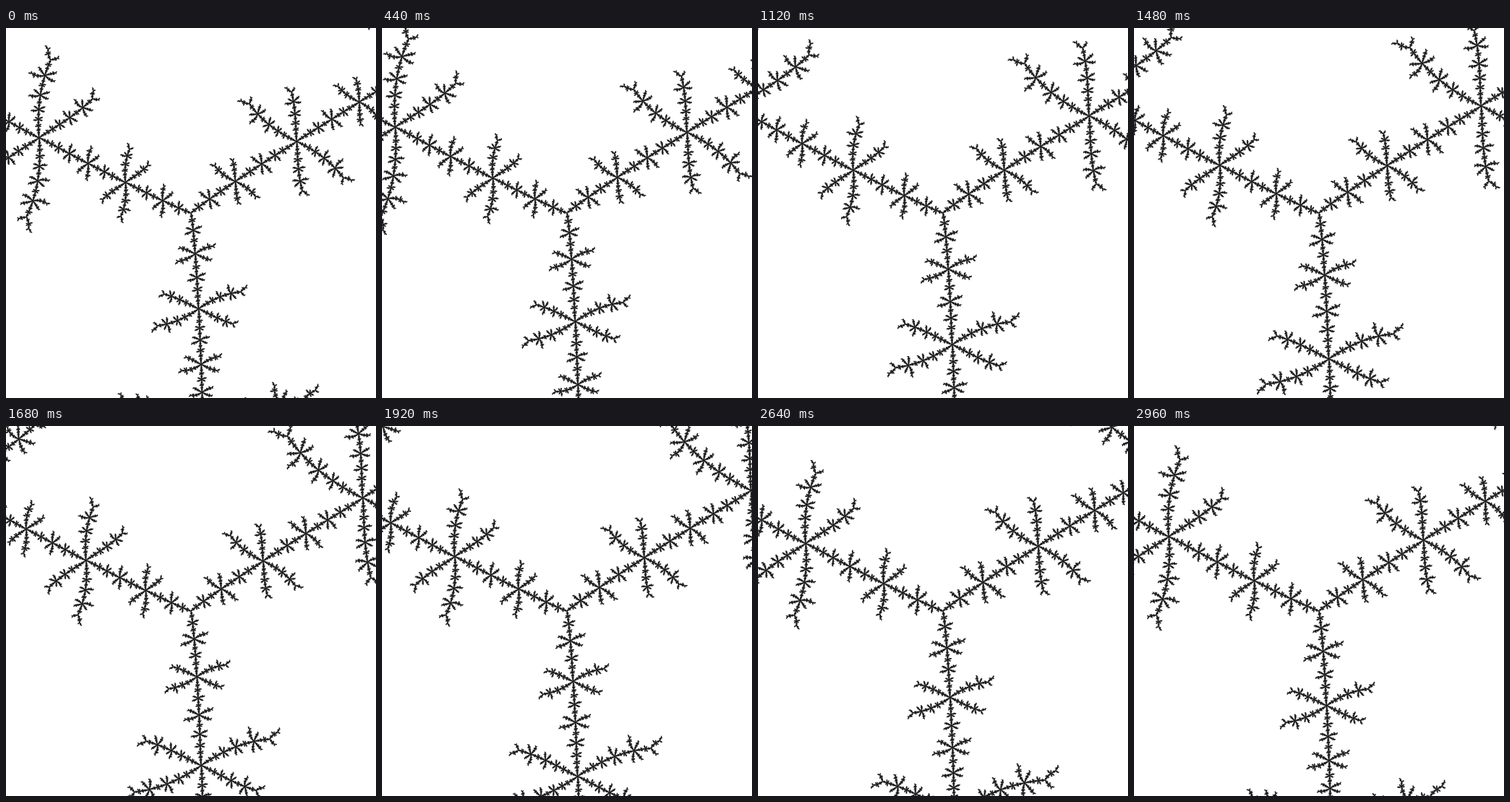
Recreate the animation shown at these times as an HTML page with a canvas. Size 512x512 px, loop 3 s.

```html
<!DOCTYPE html>
<html lang="en">
<head>
<meta charset="utf-8">
<title>Dendrite zoom</title>
<style>
  html, body { margin: 0; width: 100%; height: 100%; overflow: hidden; background: #fff; }
  canvas { display: block; width: 100vmin; height: 100vmin; }
</style>
</head>
<body>
<canvas id="stage" width="512" height="512"></canvas>
<script>
const SIZE = 512, LOOP = 3000, STEP = 40;
const MAX_ITER = 110, BAILOUT = 1e6, LINE = 0.7;
const DEPTH = 30;

const ctx = document.getElementById('stage').getContext('2d');
const image = ctx.createImageData(SIZE, SIZE);
const pixels = new Uint32Array(image.data.buffer);

const mul = (a, b) => [a[0] * b[0] - a[1] * b[1], a[0] * b[1] + a[1] * b[0]];
const sub = (a, b) => [a[0] - b[0], a[1] - b[1]];
const polar = (r, angle) => [r * Math.cos(angle), r * Math.sin(angle)];
const abs = a => Math.hypot(a[0], a[1]);
const arg = a => Math.atan2(a[1], a[0]);
const sqrt = a => polar(Math.sqrt(abs(a)), arg(a) / 2);

// Julia set of z² + c whose critical orbit lands on the three-armed fixed point.
const c = [-0.1010963638456221, 0.9562865108091415];
const root = sqrt([1 - 4 * c[0], -4 * c[1]]);
const fixed = [(1 - root[0]) / 2, -root[1] / 2];
const multiplier = [2 * fixed[0], 2 * fixed[1]];

// Zooming by the cubed multiplier maps the picture onto itself.
const loopGrowth = 3 * Math.log(abs(multiplier));
const loopTurn = 3 * arg(multiplier) - 2 * Math.PI;

// Pull the critical point back towards the fixed point along its arm.
let branch = [0, 0];
for (let i = 0; i < DEPTH; i++) {
  const s = sqrt(sub(branch, c));
  const sign = s[0] * fixed[0] + s[1] * fixed[1] < 0 ? -1 : 1;
  branch = [sign * s[0], sign * s[1]];
}

// Complex units per pixel that put this branch point at its starting place.
const offset = sub(branch, fixed);
const startScale = polar(abs(offset) / 176.6, arg(offset) - 34.1 * Math.PI / 180);

let scale = startScale, pixelSize = 1;

// Estimated distance to the set, in pixels.
function distance(px, py) {
  const dx = px - SIZE / 2, dy = SIZE / 2 - py;
  let x = fixed[0] + dx * scale[0] - dy * scale[1];
  let y = fixed[1] + dx * scale[1] + dy * scale[0];
  let slope2 = pixelSize * pixelSize;
  for (let i = 0; i < MAX_ITER; i++) {
    const xx = x * x, yy = y * y, r2 = xx + yy;
    if (r2 > BAILOUT) return Math.sqrt(r2 / slope2) * Math.log(r2) / 2;
    slope2 *= 4 * r2;
    y = 2 * x * y + c[1];
    x = xx - yy + c[0];
  }
  return 0;
}

const lightness = (px, py) => Math.min(1, distance(px, py) / LINE);

// Average of four samples inside one pixel.
function shade(x, y) {
  const a = 0.25, b = 0.75;
  const sum = lightness(x + a, y + a) + lightness(x + b, y + a)
            + lightness(x + a, y + b) + lightness(x + b, y + b);
  const v = Math.round(255 * sum / 4);
  pixels[y * SIZE + x] = 0xff000000 | v << 16 | v << 8 | v;
}

// Split only those squares that the set may touch.
function paint(x, y, size) {
  if (distance(x + size / 2, y + size / 2) > 1.5 * size + 2 * LINE) return;
  if (size === 1) return shade(x, y);
  const h = size / 2;
  paint(x, y, h);
  paint(x + h, y, h);
  paint(x, y + h, h);
  paint(x + h, y + h, h);
}

function draw(progress) {
  const zoom = polar(Math.exp(-loopGrowth * progress), -loopTurn * progress);
  scale = mul(startScale, zoom);
  pixelSize = abs(scale);
  pixels.fill(0xffffffff);
  paint(0, 0, SIZE);
  ctx.putImageData(image, 0, 0);
}

let start = null, shown = -1;
function tick(now) {
  if (start === null) start = now;
  const step = Math.floor((now - start) % LOOP / STEP);
  if (step !== shown) {
    shown = step;
    draw(step * STEP / LOOP);
  }
  requestAnimationFrame(tick);
}
requestAnimationFrame(tick);
</script>
</body>
</html>
```
